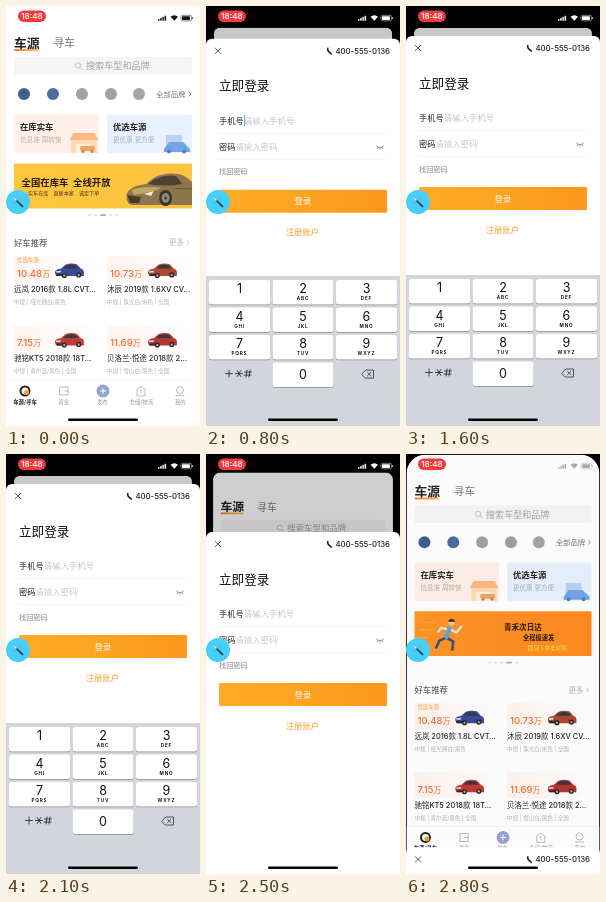
Recreate the animation shown at these times as an HTML page. Size 194 by 420 pixels, loop 2900 ms.

```html
<!DOCTYPE html>
<html lang="zh-CN">
<head>
<meta charset="utf-8">
<style>
html, body { margin: 0; width: 100%; height: 100%; overflow: hidden; background: #000; }
svg { display: block; font-family: Inter, "Noto Sans CJK SC", "Noto Sans CJK", sans-serif; }
</style>
</head>
<body>
<svg id="stage" width="194" height="420" viewBox="0 0 194 420"></svg>
<script>
const LOOP = 2900, STEP = 100, TRAVEL = 390, KEYS_TRAVEL = 151;
const ORANGE = '#fb9d22', GREY = '#b4b4b6', INK = '#222';

// Markup helpers; text is placed by its vertical centre.
const text = (x, y, size, str, fill = INK, weight = 400, anchor = 'start') =>
  `<text x="${x}" y="${y + size * 0.37}" font-size="${size}" fill="${fill}" font-weight="${weight}" text-anchor="${anchor}">${str}</text>`;
const rect = (x, y, w, h, fill, r = 0, more = '') =>
  `<rect x="${x}" y="${y}" width="${w}" height="${h}" rx="${r}" fill="${fill}" ${more}/>`;
const dot = (x, y, r, fill) => `<circle cx="${x}" cy="${y}" r="${r}" fill="${fill}"/>`;
const shape = (d, fill) => `<path d="${d}" fill="${fill}"/>`;
const line = (d, color, width = 0.8) =>
  `<path d="${d}" fill="none" stroke="${color}" stroke-width="${width}" stroke-linecap="round" stroke-linejoin="round"/>`;

const car = (x, y, color) => `<g transform="translate(${x} ${y}) scale(1.03 1.08)">
  ${shape('M1 10C1 7 4 6.5 7 6L11 2.5Q16 .5 22 2L26 6Q29 7 29 9V13H2Z', color)}
  ${shape('M9 6L12 3.3Q16 2 21 3L24 6Z', '#343a45')}
  ${shape('M2 8.5L7 8L6 9.8H2Z', '#e8e6e6')}${shape('M2 11H10L9 13H3Z', '#2c2a30')}
  ${dot(10, 12.5, 2.4, '#26262a')}${dot(24, 12, 2.4, '#26262a')}${dot(10, 12.5, 1.1, '#aaa')}${dot(24, 12, 1.1, '#aaa')}</g>`;

const listing = (x, y, price, color, title, detail) =>
  rect(x, y - 17, 85, 26, 'url(#blush)', 1)
  + `<text x="${x + 3}" y="${y + 3.6}" font-size="9.6" font-weight="500" fill="#ff6a2b">${price}<tspan font-size="8">万</tspan></text>`
  + car(x + 40, y - 11, color)
  + text(x, y + 16, 7.5, title, INK, 500)
  + text(x, y + 28.5, 5.6, detail, GREY);

const feature = (x, fill, title, note, noteColor) =>
  rect(x, 108.5, 85, 38.5, fill, 1.5) + text(x + 6, 121, 8.4, title, INK, 600) + text(x + 6, 134, 6.6, note, noteColor);

const header = text(8, 36.8, 12.8, '车源', INK, 600)
  + rect(8, 43, 25, 2, 'url(#warm)', 1)
  + text(47.5, 37, 10.8, '寻车', '#777')
  + rect(8, 51, 178, 17.5, '#f7f4f6', 2)
  + `<circle cx="72" cy="59.5" r="2.7" fill="none" stroke="${GREY}" stroke-width=".8"/>` + line('M74 61.5L76 63.5', GREY)
  + text(80, 60, 9.1, '搜索车型和品牌', '#a3a3a7')
  + [[18, '#3d5f92'], [47, '#4a6f9c'], [76, '#a0a2a5'], [105, '#a0a0a3'], [133, '#a4a6a8']]
      .map(([x, color]) => dot(x, 88, 6, color)).join('')
  + text(150, 88, 7.4, '全部品牌', '#777') + line('M183 86L185 88L183 90', '#777');

const features = feature(8, '#fff1e8', '在库实车', '信息准 周转快', '#bba99c')
  + rect(65, 134, 26, 13, '#ffd9b5') + shape('M67 127H89L92 134H64Z', '#fdb981')
  + rect(70, 138, 15, 9, '#fff0e2') + rect(74, 140, 15, 5, '#f6a25e', 2)
  + dot(77, 145.5, 1.5, '#c98150') + dot(86, 145.5, 1.5, '#c98150')
  + feature(101, '#e9f1fe', '优选车源', '更优惠 更方便', '#9fb0c6')
  + rect(160, 129, 16, 12, '#b7d0f4', 1) + shape('M158 143L163 136H177L184 143V146H158Z', '#74a4e4')
  + dot(163, 145.5, 2, '#4d7cc0') + dot(178, 145.5, 2, '#4d7cc0');

const carBanner = `<g id="carBanner">${rect(8, 157.5, 178, 45, 'url(#gold)')}
  ${text(15.5, 176.5, 9.4, '全国在库车', '#241c12', 700)}${text(67, 176.5, 9.4, '全线开放', '#241c12', 700)}
  ${text(22, 187, 5.1, '实车在库　直联本家　诚定下单', '#4a3518', 500)}
  <g transform="translate(186 1) scale(.8 1) translate(-186 0)">
  ${shape('M104 188C107 181 116 178 129 177C139 168 153 165 168 167C177 168 182 172 186 175V198H112C106 198 104 194 104 188Z', '#8d764c')}
  ${shape('M131 177C141 170 152 168 166 169L174 177Q152 180 131 177Z', '#4b4232')}
  ${shape('M110 183Q126 178 148 181Q136 185 114 188Z', '#c3a566')}
  ${shape('M105 188L122 190L120 196H109Z', '#453b2c')}
  ${shape('M126 187L138 184L135 189Z', '#f6ecd2')}
  ${dot(153, 191, 8, '#38332b')}${dot(153, 191, 5, '#958a72')}${dot(153, 191, 1.5, '#333')}
  ${line('M163 182Q176 181 186 182', '#5c4b2f')}</g></g>`;

const runnerBanner = `<g id="runnerBanner">${rect(8, 157.5, 178, 45, 'url(#sunset)')}
  ${line('M43 175L40 184L33 187L30 194M40 184L47 188L46 196', '#31517d', 2.6)}
  ${line('M43 175L50 179L55 173M42 176L35 174L32 178', '#d9edf5', 2.2)}
  ${line('M43 175L40 183', '#5fa9d0', 4.5)}${dot(45, 169, 3, '#f5c69b')}
  ${shape('M42 168A3.3 3.3 0 0 1 48.5 168Z', '#2c2430')}
  ${line('M14 176H24M12 184H22M18 169H28', '#ffb566', 0.7)}
  ${text(98, 173.5, 7.6, '青禾次日达', '#2a1a10', 700)}
  ${text(117, 184.5, 6.3, '全程极速发', '#2a1a10', 700)}
  ${text(122, 194, 5.6, '即刻下单准时到', '#ffe24d', 500)}</g>`;

const market = text(8, 236.5, 8.4, '好车推荐', '#444') + text(163, 236.5, 7.5, '更多', GREY) + line('M181 234.5L183 236.5L181 238.5', GREY)
  + listing(8, 267, '10.48', '#3b4a9a', '远岚 2016款 1.8L CVT…', '中规 | 哑光拥白/黑色')
  + listing(101, 267, '10.73', '#ae482f', '沐辰 2019款 1.6XV CV…', '中规 | 珠光白/米色 | 全国')
  + listing(8, 336.5, '7.15', '#c53a31', '驰铭KT5 2018款 18T…', '中规 | 青尔蓝/黑色 | 全国')
  + listing(101, 336.5, '11.69', '#b8352f', '贝洛兰·悦途 2018款 2…', '中规 | 雪山白/黑色 | 全国')
  + text(11, 254, 5.4, '优选车源', '#ff9a3c');

const tabs = rect(0, 374, 194, 46, '#fff') + rect(0, 374, 194, 0.5, '#eee')
  + `<g transform="translate(0 1)">` + dot(19, 384, 5.5, '#222') + dot(19, 384, 3.5, '#fff') + dot(20.5, 385.5, 2.5, ORANGE)
  + line('M54 380H62V388H54ZM59 384H62', '#aaa')
  + dot(97, 384, 6.5, '#97a4cd') + line('M94.5 384H99.5M97 381.5V386.5', '#fff', 1.1)
  + line('M131 388.5V382.5L135 379.5L139 382.5V388.5ZM135 383V385.5', '#aaa')
  + line('M170 388.5H178', '#aaa') + `<circle cx="174" cy="383" r="3.5" fill="none" stroke="#aaa" stroke-width=".8"/>`
  + ['车源/寻车', '资金', '发布', '仓储/物流', '我的']
      .map((name, i) => text(19 + i * 38.8, 394.8, 5.4, name, i ? '#999' : INK, i ? 400 : 600, 'middle')).join('') + '</g>';

const sheet = rect(0, 30, 194, 430, '#fff', 6)
  + line('M9.3 39.3L14.7 44.7M14.7 39.3L9.3 44.7', '#333')
  + line('M121.8 39.5Q120.8 42 125.3 45', INK, 1.6)
  + text(184, 42, 7.8, '400-555-0136', INK, 500, 'end')
  + text(13, 77, 12.6, '立即登录', '#111', 500)
  + text(13, 112, 8.2, '手机号', INK) + text(38, 112, 8.4, '请输入手机号', '#c6c6c9')
  + rect(38.2, 106.5, 1, 11, '#3eb0c8', 0.5, 'id="caret"') + rect(13, 124.5, 168, 0.5, '#ececec')
  + text(13, 138, 8.2, '密码', INK) + text(29.5, 138, 8.4, '请输入密码', '#c6c6c9')
  + line('M170.5 137Q174 140.5 177.5 137M172 138.5L171.2 139.8M174 139V140.5M176 138.5L176.8 139.8', '#777', 0.7)
  + rect(13, 150.5, 168, 0.5, '#ececec')
  + text(13, 163, 7.2, '找回密码', '#888')
  + rect(13, 181, 168, 23, 'url(#button)', 1)
  + text(97, 192.5, 8.2, '登录', '#fff', 500, 'middle')
  + text(96.5, 223.5, 8.2, '注册账户', ORANGE, 400, 'middle');

const letters = ['', 'ABC', 'DEF', 'GHI', 'JKL', 'MNO', 'PQRS', 'TUV', 'WXYZ'];
const key = (col, row) => {
  const x = 3 + col * 63.5, y = 273 + row * 27.5;
  return rect(x, y + 0.8, 61, 24.4, '#898b90', 2.5) + rect(x, y, 61, 24.4, '#fff', 2.5);
};
const keyboard = rect(0, 269, 194, 160, '#d2d5db')
  + letters.map((label, i) => {
      const col = i % 3, row = Math.floor(i / 3), x = 33.5 + col * 63.5, y = 273 + row * 27.5;
      return key(col, row) + text(x, y + 8.5, 12.5, i + 1, '#111', 400, 'middle')
        + `<text x="${x}" y="${y + 20}" font-size="4.7" font-weight="600" letter-spacing=".8" text-anchor="middle">${label}</text>`;
    }).join('')
  + key(1, 3) + text(97, 367.5, 12.5, '0', '#111', 400, 'middle')
  + line('M19.5 366.5H26.5M23 363V370M29.5 366.5H36.5M31.2 363.5L34.8 369.5M34.8 363.5L31.2 369.5M41 363L40 370M44 363L43 370M38.5 365H45.5M38 368H45', '#333', 0.9)
  + line('M156 367L159.5 363H167.5V371H159.5ZM161.5 365.3L165 368.7M165 365.3L161.5 368.7', '#333');

const status = rect(12, 4.5, 28, 11.5, '#f5383a', 5.7) + text(26, 10.2, 8, '18:48', '#fff', 600, 'middle')
  + `<g id="signals" transform="translate(0 1.5)">${[0, 1, 2, 3].map(i => `<rect x="${152 + i * 2.2}" y="${11.5 - i * 1.1}" width="1.5" height="${1.7 + i * 1.1}" rx=".4"/>`).join('')}
  <path d="M164.5 9.3Q168.3 6.3 172 9.3L168.3 13.2Z"/>
  <rect x="175" y="7.8" width="10.5" height="5.6" rx="1.6" fill="none" stroke="currentColor" stroke-width=".5"/>
  <rect x="176" y="8.8" width="8" height="3.6" rx=".8"/><rect x="186.2" y="9.6" width=".8" height="2" rx=".4"/></g>`;

const wand = dot(12, 196, 12, '#45cffc') + line('M10 194L16.5 200.5', '#33343c', 1.7) + line('M9 193L10 194', '#fff', 1.6)
  + line('M13 193L14 192M8.5 197L9.3 196.2', '#e5533d', 0.7);

const gradient = (id, from, to) =>
  `<linearGradient id="${id}"><stop stop-color="${from}"/><stop offset="1" stop-color="${to}"/></linearGradient>`;

const $ = id => document.getElementById(id);
$('stage').innerHTML = `<defs>${gradient('warm', '#ff7a2f', '#ffc25c')}${gradient('gold', '#ffc53e', '#fdc441')}
  ${gradient('sunset', '#ff9527', '#ff8a20')}${gradient('button', '#ffac27', '#fc981d')}${gradient('blush', '#fff4ef', '#fff')}
  <clipPath id="screen"><rect id="corners" width="194" height="420"/></clipPath></defs>
  ${rect(0, 0, 194, 420, '#000')}
  <g id="home"><g clip-path="url(#screen)">${rect(0, 0, 194, 420, '#fff')}
    ${header}${features}${carBanner}${runnerBanner}<g id="pager"></g>${market}${tabs}
    ${rect(0, 0, 194, 420, '#000', 0, 'id="shade"')}</g></g>
  <g id="sheet">${sheet}</g><g id="keyboard">${keyboard}</g>
  ${status}${rect(62, 412.5, 70, 2.6, '#000', 1.3)}${wand}`;

const pager = active => {
  let x = 82;
  return [0, 1, 2, 3, 4].map(i => {
    const width = i === active ? 6 : 3, mark = rect(x, 208.2, width, 1.8, i === active ? '#aaa' : '#ddd', 0.9);
    x += width + 3;
    return mark;
  }).join('');
};

// Critically damped spring: 0 until it starts, then settles at 1.
const spring = elapsed => {
  const x = 0.0365 * Math.max(0, elapsed);
  return 1 - (1 + x) * Math.exp(-x);
};
const OPEN_AT = 608, DRAG_AT = 2190, RELEASE_AT = 2688, DRAG_SPEED = 0.155;

function sheetOffset(t) {
  if (t < DRAG_AT) return TRAVEL * (1 - spring(t - OPEN_AT));
  const dragged = (Math.min(t, RELEASE_AT) - DRAG_AT) * DRAG_SPEED;
  return dragged + (TRAVEL - dragged) * spring(t - RELEASE_AT);
}

function draw(t) {
  const offset = sheetOffset(t), open = offset / TRAVEL, scale = 0.917 + 0.083 * open;
  const keysUp = spring(t - OPEN_AT) - spring(t - DRAG_AT);
  const later = t >= 1500;
  $('home').setAttribute('transform', `translate(${97 * (1 - scale)} ${22 * (1 - open) ** 1.3}) scale(${scale})`);
  $('corners').setAttribute('rx', open < 1 ? 6 + 14 * open : 0);
  $('shade').setAttribute('opacity', 0.22 * (1 - open));
  $('sheet').setAttribute('transform', `translate(0 ${offset})`);
  $('sheet').style.display = open < 1 ? '' : 'none';
  $('keyboard').setAttribute('transform', `translate(0 ${KEYS_TRAVEL * (1 - keysUp)})`);
  $('keyboard').style.display = keysUp > 0.01 ? '' : 'none';
  $('caret').style.display = t > OPEN_AT && t < DRAG_AT && (t - 700) % 500 < 250 ? '' : 'none';
  $('carBanner').style.display = later ? 'none' : '';
  $('runnerBanner').style.display = later ? '' : 'none';
  $('pager').innerHTML = pager(later ? 3 : 2);
  const ink = open < 0.5 ? '#fff' : open < 1 ? '#aaa' : '#111';
  $('signals').setAttribute('fill', ink);
  $('signals').style.color = ink;
}

const start = performance.now();
function tick() {
  const t = (performance.now() - start) % LOOP;
  draw(Math.floor(t / STEP) * STEP);
  requestAnimationFrame(tick);
}
tick();
</script>
</body>
</html>
```
